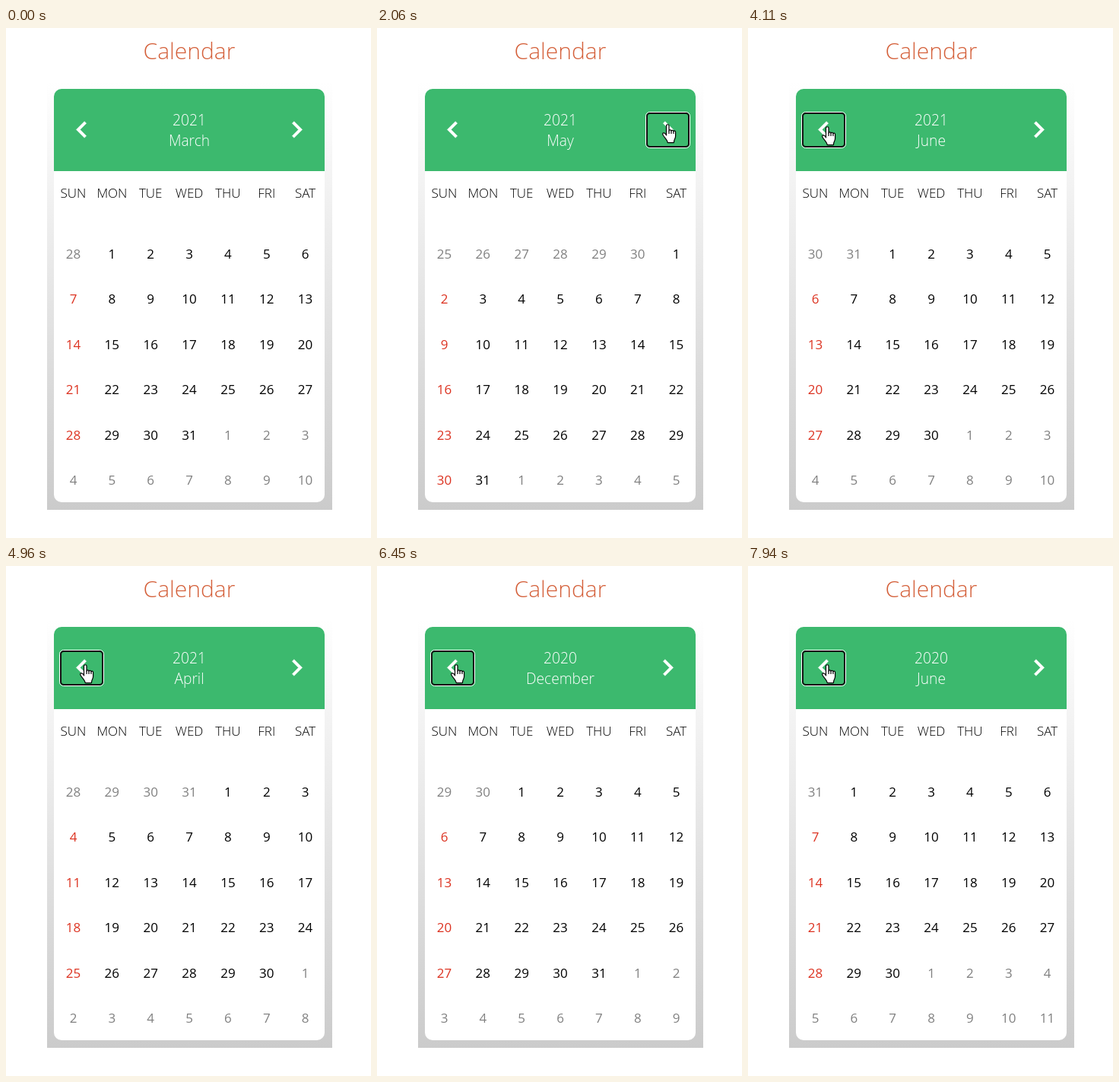
Animation, 480 px wide and 670 px high, one loop 8 s. Source, as an HTML page:

```html
<!DOCTYPE html>
<html lang="en">
<head>
<meta charset="utf-8">
<title>Calendar</title>
<style>
html, body { margin: 0; width: 100%; height: 100%; overflow: hidden; background: #fff; }
svg { display: block; width: 480px; height: 670px; }
text { font-family: "Open Sans", sans-serif; font-weight: 300; font-size: 17px; text-anchor: middle; }
.title { font-size: 30px; fill: #d4603a; }
.head { font-size: 19.2px; font-weight: 350; fill: #fff; }
.day, .out { font-weight: 400; }
.sun { fill: #dc3220; }
.out { fill: #808080; }
</style>
</head>
<body>
<svg viewBox="0 0 480 670">
  <defs>
    <linearGradient id="shade" x2="0" y2="1">
      <stop stop-color="#fff"/><stop offset="1" stop-color="#cbcbcb"/>
    </linearGradient>
    <path id="chevron" d="M10 6 8.59 7.41 13.17 12l-4.58 4.59L10 18l6-6z" fill="#fff" stroke="#fff" stroke-width=".25"/>
  </defs>
  <rect x="54" y="70" width="375" height="563" fill="url(#shade)"/>
  <rect x="63" y="80" width="356" height="543" rx="10" fill="#fff"/>
  <path d="M63 188V90a10 10 0 0 1 10-10h336a10 10 0 0 1 10 10v98z" fill="#3cb96e"/>
  <text class="title" x="241" y="41">Calendar</text>
  <text class="head" id="year" x="241" y="128"></text>
  <text class="head" id="month" x="241" y="155"></text>
  <use href="#chevron" transform="translate(99 133.5) scale(-1.8 1.8) translate(-12.3 -12)"/>
  <use href="#chevron" transform="translate(383 133.5) scale(1.8) translate(-12.3 -12)"/>
  <g id="grid"></g>
  <g id="ring" fill="none">
    <rect x=".5" y="110.5" width="58" height="47" rx="5" stroke="#fff"/>
    <rect x="2" y="112" width="55" height="44" rx="4" stroke="#101010" stroke-width="2"/>
  </g>
  <g id="pointer" fill="#fff" stroke="#000" stroke-linejoin="round">
    <path id="arrow" d="M.5.5V17l3.8-3.6 2.6 6 2.6-1.1-2.6-5.9h5.2z"/>
    <g id="hand" transform="translate(-6 -1)" stroke-width="1.2">
      <path d="M5.5 15V2.6C5.5.1 9 .1 9 2.6V9c.2-1.6 3-1.6 3 .4.2-1.5 3-1.4 3 .5.3-1.3 2.6-1.2 2.6.8V16c0 3.4-2.2 4.4-2.2 8.6H7.2C7.2 21 .7 16 .7 13.2c0-2 2.9-2.1 4.8 1.4z"/>
      <path d="M9 9v4M12 9.4V13M15 9.9V13" fill="none"/>
    </g>
    <circle id="press" r="15" fill="#e1e100" fill-opacity=".6" stroke="none"/>
  </g>
</svg>
<script>
const LOOP = 8000, TICK = 76, HOLD = 80;
const $ = id => document.getElementById(id);

// Pointer glides: each starts where the last one ended and bends towards "via".
const START = [467, 261];
const glides = [
  { from: 120, until: 580, via: [405, 66], to: [388, 126] },
  { from: 900, until: 1050, via: [383, 130], to: [376, 131] },
  { from: 1280, until: 1360, via: [379, 128], to: [381, 127] },
  { from: 3560, until: 4030, via: [242, 160], to: [103, 130] }
];

// Moments at which each button is let go and the month turns.
const nextClicks = [1590, 1980, 2600, 3260];
const prevClicks = [4110, 4590, 4960, 5360, 5740, 6140, 6450, 6910, 7240, 7450, 7700, 7860, 7940];
const clicks = [...nextClicks, ...prevClicks];

const colX = c => 88.5 + 50.85 * c;
const rowY = r => Math.round(303 + 59.4 * r);
const countBy = (times, t) => times.filter(c => t >= c).length;
const show = (id, on) => $(id).setAttribute('visibility', on ? 'visible' : 'hidden');

function addText(x, y, label = '') {
  const el = document.createElementNS('http://www.w3.org/2000/svg', 'text');
  el.setAttribute('x', x);
  el.setAttribute('y', y);
  el.textContent = label;
  return $('grid').appendChild(el);
}

['SUN', 'MON', 'TUE', 'WED', 'THU', 'FRI', 'SAT'].forEach((d, c) => addText(colX(c), 223, d));
const cells = Array.from({ length: 42 }, (_, i) => addText(colX(i % 7), rowY(Math.floor(i / 7))));

function showMonth(shift) {
  const first = new Date(2021, 2 + shift, 1);
  const year = first.getFullYear(), month = first.getMonth();
  $('year').textContent = year;
  $('month').textContent = first.toLocaleString('en-US', { month: 'long' });
  cells.forEach((cell, i) => {
    const d = new Date(year, month, 1 - first.getDay() + i);
    cell.textContent = d.getDate();
    cell.setAttribute('class', d.getMonth() !== month ? 'out' : i % 7 ? 'day' : 'day sun');
  });
}

function pointerAt(t) {
  let pos = START;
  for (const g of glides) {
    if (t < g.from) break;
    const span = g.until - g.from, steps = Math.round(span / TICK);
    const p = Math.min(1, Math.floor(steps * (t - g.from) / span) / steps), q = 1 - p;
    pos = pos.map((a, i) => q * q * a + 2 * p * q * g.via[i] + p * p * g.to[i]);
  }
  return pos.map(Math.round);
}

let shown = null;

function draw(t) {
  const shift = countBy(nextClicks, t) - countBy(prevClicks, t);
  if (shift !== shown) showMonth(shown = shift);

  const focused = t >= nextClicks[0] - HOLD;
  const onPrev = t >= prevClicks[0] - HOLD;
  show('ring', focused);
  $('ring').setAttribute('transform', `translate(${onPrev ? 70 : 353} 0)`);

  const [x, y] = pointerAt(t);
  const inside = t >= glides[0].from;
  const onButton = y > 111 && y < 157 && ((x > 354 && x < 411) || (x > 71 && x < 128));
  $('pointer').setAttribute('transform', `translate(${x} ${y})`);
  show('hand', inside && onButton);
  show('arrow', inside && !onButton);
  show('press', clicks.some(c => t >= c - HOLD && t < c));
}

function frame() {
  draw(performance.now() % LOOP);
  requestAnimationFrame(frame);
}
frame();
</script>
</body>
</html>
```
